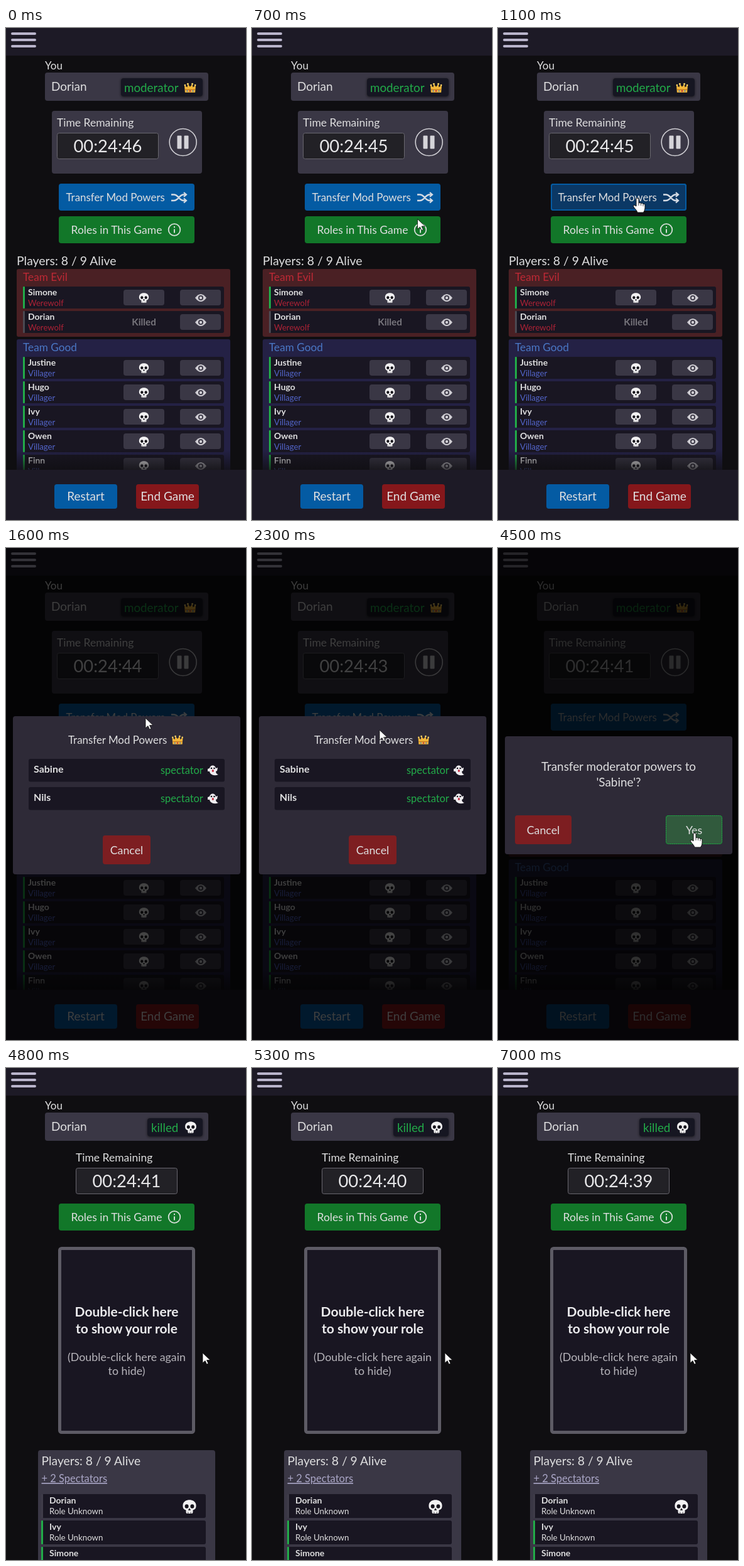
Write an HTML page that moves like this. It is 382 px wide and 784 px high and loops after 7.2 s.

```html
<!DOCTYPE html>
<html lang="en">
<head>
<meta charset="utf-8">
<title>Moderator transfer</title>
<style>
html, body { margin: 0; width: 100%; height: 100%; overflow: hidden; background: #0f0e11; }
svg { display: block; width: 100%; height: 100%; }
text { font-family: Lato, "Open Sans", sans-serif; white-space: pre; }
</style>
</head>
<body>
<svg id="stage" viewBox="0 0 382 784" xmlns="http://www.w3.org/2000/svg"></svg>
<script>
const LOOP = 7200;
const C = {
  page: '#0f0e11', bar: '#1d1a26', panel: '#3a3745', row: '#191622', modal: '#2e2a37',
  text: '#dededf', green: '#22ab49', blue: '#045ba3', roles: '#127729', red: '#85171b'
};
const ME = 'Dorian', HEIR = 'Sabine';

const rect = (x, y, w, h, fill, rx = 3, extra = '') =>
  `<rect x="${x}" y="${y}" width="${w}" height="${h}" rx="${rx}" fill="${fill}" ${extra}/>`;
const text = (x, y, size, str, fill = C.text, extra = '') =>
  `<text x="${x}" y="${y}" font-size="${size}" fill="${fill}" ${extra}>${str}</text>`;
const mid = (x, y, size, str, fill = C.text, extra = '') =>
  text(x, y, size, str, fill, 'text-anchor="middle" ' + extra);
const bold = (x, y, size, str) => text(x, y, size, str, C.text, 'font-weight="700"');
const at = (x, y, body, scale = 1) => `<g transform="translate(${x} ${y}) scale(${scale})">${body}</g>`;
const group = (id, body) => `<g id="${id}">${body}</g>`;

const skull = (x, y, size) => at(x, y, `
  <path d="M-5 5C-9 4-10 1-9.500-3C-8-12 8-12 9.500-3C10 1 9 4 5 5V8Q5 10 3 10H-3Q-5 10-5 8Z" fill="#f2f1f2"/>
  <ellipse cx="-4" cy="-.5" rx="2.7" ry="2.9" fill="#15131b"/><ellipse cx="4" cy="-.5" rx="2.7" ry="2.9" fill="#15131b"/>
  <path d="M0 2.500L-1.500 5H1.500ZM-2 7.500V10M2 7.500V10" fill="#15131b" stroke="#15131b" stroke-width=".7"/>`, size / 20);
const crown = (x, y, size) => at(x, y, `
  <path d="M-9 8L-10-5L-5-1L-4-7L0-2L4-7L5-1L10-5L9 8Z" fill="#f5b83a"/>
  <path d="M-9 3H9" stroke="#bd7622" stroke-width="1.5"/>
  <g fill="#ffd768"><circle cx="-9" cy="-5" r="1.5"/><circle cx="-4" cy="-7" r="1.6"/><circle cx="4" cy="-7" r="1.6"/><circle cx="9" cy="-5" r="1.5"/></g>
  <circle cy="5.5" r="1.5" fill="#c33a3b"/><circle cx="-5" cy="5.5" r="1.2" fill="#437cc0"/><circle cx="5" cy="5.5" r="1.2" fill="#437cc0"/>`, size / 20);
const ghost = (x, y) => at(x, y, `
  <path d="M-5-3C-4-9 4-9 5-3L8-4L7 1L5 2Q5 6 9 7Q2 10-3 6Q-5 4-5 2L-8 2L-8-2Z" fill="#efedf0"/>
  <circle cx="-2" cy="-3" r="1.3" fill="#16131c"/><circle cx="2.5" cy="-3" r="1.3" fill="#16131c"/>
  <ellipse cx=".3" cy="1" rx="1.6" ry="2" fill="#c42f43"/>`);
const eye = (x, y) => at(x, y, `
  <path d="M-9 0Q0-12 9 0Q0 12-9 0Z" fill="#cfcdd3"/><circle r="4" fill="${C.panel}"/><circle r="2.2" fill="#cfcdd3"/>`);
const shuffle = `<g fill="none" stroke="#d5dbe4" stroke-width="2.6">
  <path d="M263 265.500H267C275 265.500 275 275 283 275H286M263 275H267C275 275 275 265.500 283 265.500H286"/>
  <path d="M283 262L287 265.500L283 269M283 271.500L287 275L283 278.500" stroke-width="2.2"/></g>`;

const button = (x, y, w, h, fill, label, size) =>
  rect(x, y, w, h, fill, 4) + mid(x + w / 2, y + h / 2 + 6.5, size, label);
const menu = rect(0, 0, 382, 44, C.bar, 0) +
  [9, 19, 29].map(y => rect(8, y - 2, 40, 4, '#b9b4cb', 2)).join('');
const userCard = (badgeX, badge) => text(62, 66, 17, 'You') + rect(62, 71, 260, 45, C.panel, 4) +
  text(72, 100, 19, ME) + rect(badgeX, 80, 313 - badgeX, 29, '#191721', 4, 'filter="url(#soft)"') + badge;
const clock = (x, y) => text(x, y - 10, 17.5, 'Time Remaining') +
  rect(x + .5, y + .5, 161, 41, '#222126', 3, 'stroke="#69676f"') +
  mid(x + 81, y + 31, 27.4, '', '#e8e8ea', 'class="clock"');
const rolesButton = y => rect(84, y, 216, 43, C.roles, 4) + text(103.5, y + 28, 17.5, 'Roles in This Game') +
  `<circle cx="268" cy="${y + 21.5}" r="9.3" fill="none" stroke="#d5ded7" stroke-width="1.8"/>
   <path d="M268 ${y + 20.5}V${y + 26.5}M268 ${y + 16}V${y + 18.2}" stroke="#d5ded7" stroke-width="2"/>`;

function playerRow(y, name, role, color, alive = true) {
  const kill = alive ? rect(187, y + 5, 65, 25, C.panel, 4) + skull(219.5, y + 18, 16)
    : mid(219.5, y + 23, 15.2, 'Killed', '#77757c', 'font-weight="700"');
  return rect(27, y, 320, 35, C.row) + rect(27, y, 3, 35, alive ? C.green : '#4b4951', 1) +
    bold(35, y + 14, 14, name) + text(35, y + 30.5, 13.2, role, color) + kill +
    rect(277, y + 5, 65, 25, C.panel, 4) + eye(310, y + 18);
}

const moderatorView = rect(0, 0, 382, 784, C.page, 0) + menu +
  userCard(183, text(188, 102, 18.8, 'moderator', C.green) + crown(293, 95.5, 18)) +
  rect(73, 132, 239, 100, C.panel, 4) + clock(81, 167) +
  `<circle cx="281.7" cy="182" r="21.5" fill="none" stroke="#d0cfd4" stroke-width="1.6"/>` +
  rect(272.5, 171.5, 7, 21, '#d5d4d9', 1) + rect(283.5, 171.5, 7, 21, '#d5d4d9', 1) +
  rect(84, 248, 216, 43, C.blue, 4) + rect(85, 249, 214, 41, '#0b3865', 3, `id="transferHover" stroke="${C.blue}" stroke-width="2"`) +
  text(95.5, 276, 16.9, 'Transfer Mod Powers') + shuffle +
  rolesButton(300) + text(17, 378, 19.4, 'Players: 8 / 9 Alive') +
  rect(17, 384, 340, 108, '#4a2024') + text(27, 403, 17.2, 'Team Evil', '#bd2935') +
  playerRow(412, 'Simone', 'Werewolf', '#ad2236') + playerRow(451, ME, 'Werewolf', '#ad2236', false) +
  rect(17, 496, 340, 220, '#242145') + text(27, 515, 17.2, 'Team Good', '#4a77c5') +
  ['Justine', 'Hugo', 'Ivy', 'Owen', 'Finn'].map((n, i) => playerRow(524 + 39 * i, n, 'Villager', '#5264c9')).join('') +
  rect(0, 672, 382, 32, 'url(#fade)', 0) + rect(0, 704, 382, 80, C.bar, 0) +
  button(77, 727, 100, 39, C.blue, 'Restart', 19) + button(207, 727, 100, 39, C.red, 'End Game', 19);

const spectator = (y, name) => rect(36, y, 312, 36.5, C.row) + bold(44, y + 22, 16, name) +
  text(246, y + 24, 16.4, 'spectator', C.green) + ghost(329, y + 18);
const chooser = rect(11, 268, 362, 252, C.modal, 4) + text(99, 312, 16.9, 'Transfer Mod Powers') + crown(273, 306, 17) +
  spectator(336, HEIR) + spectator(381, 'Nils') + button(154, 458, 76, 46, '#7d1e21', 'Cancel', 17.8);
const confirmBox = rect(11, 300, 362, 188, C.modal, 4) +
  mid(192, 355, 18.9, 'Transfer moderator powers to') + mid(192, 380, 18.9, `'${HEIR}'?`) +
  button(27, 426, 90, 46, '#7d1e21', 'Cancel', 17.8) + rect(267, 426, 90, 46, C.roles, 4) +
  rect(267.5, 426.5, 89, 45, '#315a3d', 4, `id="yesHover" stroke="${C.green}" stroke-dasharray="2 1"`) +
  mid(312, 455.5, 17.8, 'Yes');

const listRow = (y, name, alive) => rect(57, y, 261, 38, C.row) + rect(56, y, 3, 38, alive ? C.green : '#3f3c49', 1) +
  bold(69, y + 15, 14, name) + text(69, y + 32, 13.3, 'Role Unknown');
const playerView = rect(0, 0, 382, 784, C.page, 0) + menu +
  userCard(225, text(231, 102, 18.8, 'killed', C.green) + skull(294, 94.5, 18.5)) +
  clock(111, 159) + rolesButton(216) +
  rect(85.5, 287.5, 213, 293, C.row, 3, 'stroke="#5d5b65" stroke-width="5"') +
  mid(192, 396, 21, 'Double-click here', '#ececee', 'font-weight="700"') +
  mid(192, 423, 21, 'to show your role', '#ececee', 'font-weight="700"') +
  mid(192, 467, 17.8, '(Double-click here again', '#b7b5bb') + mid(192, 489, 17.8, 'to hide)', '#b7b5bb') +
  rect(51, 609, 282, 190, C.panel, 4) + text(56.5, 633, 19.3, 'Players: 8 / 9 Alive') +
  text(56.5, 660, 16.5, '+ 2 Spectators', '#aaa6c6', 'text-decoration="underline"') +
  listRow(679, ME, false) + skull(292, 699, 22) + listRow(721, 'Ivy', true) + listRow(763, 'Simone', true);

const cursors = {
  arrow: `<path d="M0 0V16L4 12.500L6.500 18L9 17L6.500 11.500H12Z" fill="#fff" stroke="#111" stroke-width=".8"/>`,
  hand: `<path d="M-2 1Q0-1 2 1V8Q4 6.500 5.500 8.500Q7.500 7 9 9.500Q12 8.500 12 12V16Q12 19 9.500 23H0Q-1 20-3 18Q-6 15-7 12Q-5 10-2 13Z" fill="#fff" stroke="#111"/>
    <path d="M2 8V12M5.500 9V12M9 10V13" stroke="#111" stroke-width=".8"/>`,
  beam: `<path d="M-3-7H-1L0-6L1-7H3M0-6V6M-3 7H-1L0 6L1 7H3" fill="none" stroke="#09080c"/>`
};

const stage = document.getElementById('stage');
stage.innerHTML = `<defs>
  <linearGradient id="fade" x2="0" y2="1"><stop stop-color="${C.page}" stop-opacity="0"/><stop offset="1" stop-color="${C.page}" stop-opacity=".75"/></linearGradient>
  <filter id="soft" x="-10%" y="-30%" width="120%" height="160%"><feDropShadow dx="0" dy="1" stdDeviation="2" flood-opacity=".6"/></filter></defs>` +
  group('moderator', moderatorView) + rect(0, 0, 382, 784, '#000', 0, 'id="shade"') +
  group('chooser', chooser) + group('confirm', confirmBox) + group('player', playerView) +
  group('pointer', Object.entries(cursors).map(([id, body]) => group(id, body)).join(''));

const $ = id => document.getElementById(id);
const clocks = document.querySelectorAll('.clock');
const show = (id, on) => $(id).setAttribute('display', on ? 'inline' : 'none');

// [time, x, y]
const path = [[300, 382, 400], [900, 222, 271], [1600, 222, 271], [2300, 203, 290], [2700, 198, 355], [3000, 198, 372],
  [3600, 198, 372], [4300, 313, 454], [4800, 313, 454], [5100, 307, 454], [6900, 307, 454], [7000, 306, 454]];
// [start, cursor]
const shapes = [[300, 'arrow'], [800, 'hand'], [1500, 'arrow'], [2600, 'hand'], [3000, 'beam'],
  [3700, 'arrow'], [4200, 'hand'], [4800, 'arrow']];

function position(t) {
  const i = path.findIndex(p => p[0] > t);
  if (i === 0) return path[0].slice(1);
  if (i < 0) return path[path.length - 1].slice(1);
  const [t0, x0, y0] = path[i - 1], [t1, x1, y1] = path[i];
  const u = (t - t0) / (t1 - t0), k = u * u * (3 - 2 * u);
  return [x0 + (x1 - x0) * k, y0 + (y1 - y0) * k];
}

function render(time) {
  const t = Math.floor((time % LOOP) / 100) * 100;
  const seconds = 46 - Math.floor((t + 700) / 1000);
  clocks.forEach(c => { c.textContent = '00:24:' + seconds; });

  const choosing = t >= 1500 && t < 3000, confirming = t >= 3000 && t < 4800;
  show('moderator', t < 4800);
  show('shade', choosing || confirming);
  show('chooser', choosing);
  show('confirm', confirming);
  show('player', t >= 4800);
  show('transferHover', t >= 800 && t < 1500);
  show('yesHover', t >= 4200);
  $('shade').setAttribute('opacity', choosing ? .72 : .8);

  const current = shapes.filter(s => s[0] <= t).pop();
  Object.keys(cursors).forEach(id => show(id, current && current[1] === id));
  $('pointer').setAttribute('transform', `translate(${position(t).join(' ')})`);
}

const start = performance.now();
function tick() {
  render(performance.now() - start);
  requestAnimationFrame(tick);
}
tick();
</script>
</body>
</html>
```
